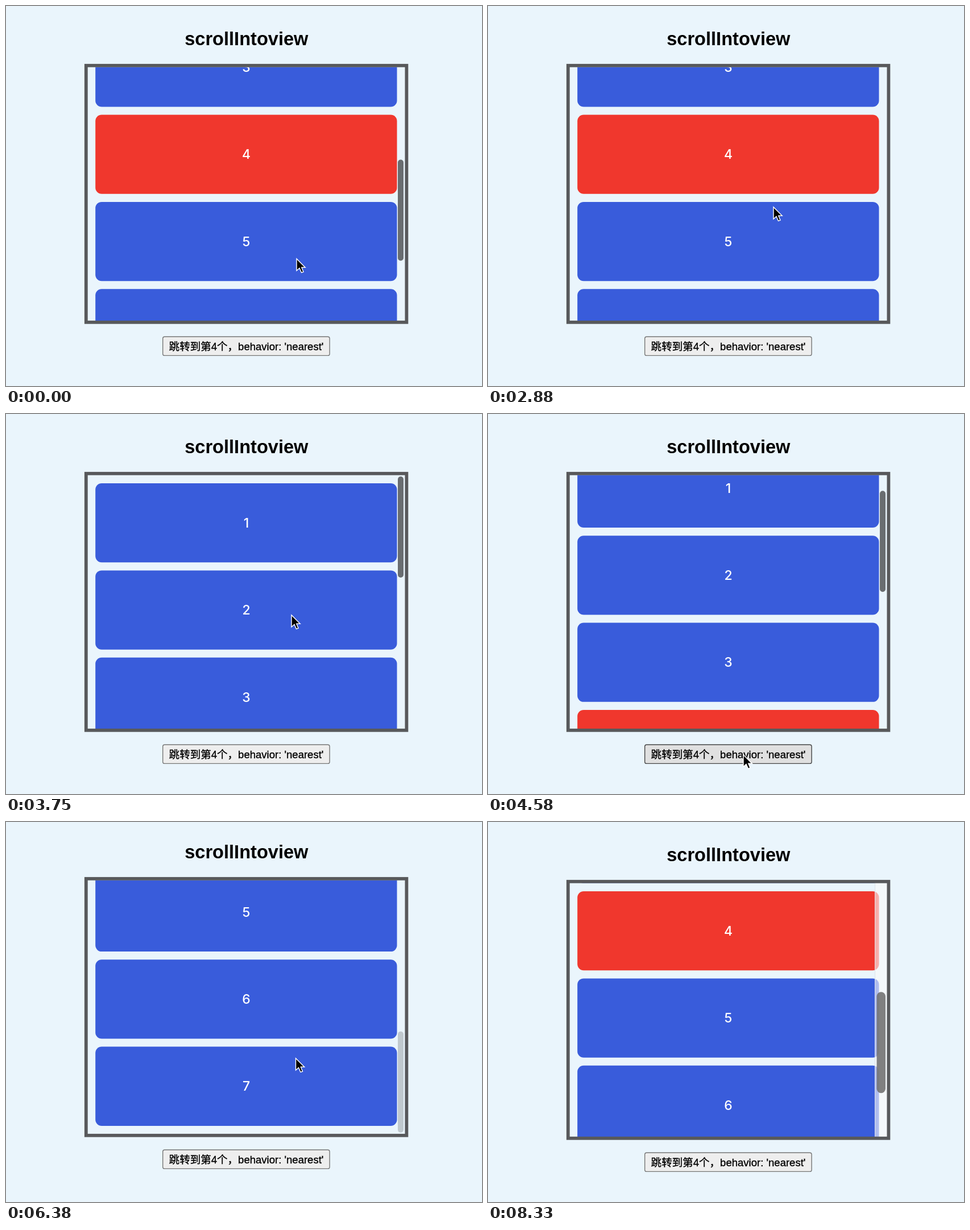
These frames come from a looping animation (837x669 px, 8370 ms). An HTML page:

```html
<!DOCTYPE html>
<html lang="zh-CN">
<head>
<meta charset="utf-8">
<style>
  html, body { margin: 0; width: 100%; height: 100%; overflow: hidden; background: #eaf5fc; }
  svg { display: block; }
  text { text-anchor: middle; font-family: "Liberation Sans", "Noto Sans CJK SC", "Noto Sans CJK", Arial, sans-serif; }
  #items text { font: 500 23px Inter, "Liberation Sans", sans-serif; fill: #fff; }
</style>
</head>
<body>
<svg width="837" height="669" viewBox="0 0 837 669">
  <clipPath id="view"><rect x="143" y="107.5" width="559" height="446.5"/></clipPath>
  <g id="page">
    <text x="422.8" y="69" font-size="32.6" font-weight="bold">scrollIntoview</text>
    <g clip-path="url(#view)">
      <g id="items"></g>
      <g id="track">
        <rect x="680" y="107" width="22" height="448" fill="#fafafa" opacity=".62"/>
        <path d="M680.5 107V555" stroke="#dfe3ea"/>
      </g>
      <rect id="thumb" height="178"/>
    </g>
    <rect x="140.8" y="104.8" width="563.6" height="452" fill="none" stroke="#58595b" stroke-width="5.8"/>
    <rect id="button" x="275.7" y="582.2" width="293.4" height="33.2" rx="3.2" stroke-width="1.4"/>
    <text x="422.5" y="606" font-size="18.55" stroke="#000" stroke-width=".35">跳转到第4个，behavior: 'nearest'</text>
  </g>
  <circle id="ring" fill="none" stroke="#000" stroke-width="1.8"/>
  <path id="cursor" d="M0 0V21L5 16.5L8.5 24.4L12 23L8.8 15.3H15.2Z" fill="#000" stroke="#fff" stroke-width="1.4"/>
</svg>
<script>
const LOOP = 8370, FPS = 24, PITCH = 153.4, BOTTOM = 641.8, START = 390.7;
const $ = id => document.getElementById(id);
const set = (id, attrs) => { for (const k in attrs) $(id).setAttribute(k, attrs[k]); };
const clamp = (v, lo = 0, hi = 1) => Math.max(lo, Math.min(hi, v));

for (let i = 0; i < 7; i++) {
  const y = 122 + i * PITCH;
  $('items').innerHTML +=
    `<rect x="157.2" y="${y}" width="530.3" height="139.3" rx="11" fill="${i == 3 ? '#f0372d' : '#395cdb'}"/>
     <text x="422.5" y="${y + 77.8}">${i + 1}</text>`;
}

// Each visit: press the button, rest elsewhere, then wheel the list to one end.
const visits = [
  { click: 1530, at: [441, 596], rest: [502, 354], wheel: 2949, end: 0 },
  { click: 4270, at: [449, 600], rest: [509.5, 416], wheel: 5254, end: BOTTOM },
  { click: 6760, at: [449, 600], rest: [780, 385] }
];

// Item 4 is fully in view between these offsets, so "nearest" is a clamp.
const nearest = scroll => clamp(scroll, 167.5, 3 * PITCH);

const moves = [], scrolls = [{ start: 0, length: 0, to: START }];
function addScroll(start, length, to) {
  if (to != scrolls.at(-1).to) scrolls.push({ start, length, to });
}
for (const { click, at, rest, wheel, end } of visits) {
  moves.push({ start: click - 360, length: 300, to: at }, { start: click + 400, length: 780, to: rest });
  addScroll(click + 148, 400, nearest(scrolls.at(-1).to));
  if (wheel) addScroll(wheel, 550, end);
}

function follow(t, value, steps, pick = to => to) {
  for (const { start, length, to } of steps) {
    if (t <= start) break;
    const u = clamp((t - start) / length);
    value += (pick(to) - value) * (1 - Math.cos(Math.PI * u)) / 2;
  }
  return value;
}

function draw(t) {
  const scroll = follow(t, START, scrolls);
  const x = follow(t, 511, moves, p => p[0]);
  const y = follow(t, 445, moves, p => p[1]);
  const last = scrolls.findLast(s => s.start <= t);
  const idle = t - last.start - last.length;
  const wide = x > 680;

  // The page gives way a little after the list hits its lower end.
  const bounce = last.to == BOTTOM ? -5 * Math.sin(Math.PI * clamp(idle / 1100)) : 0;
  set('page', { transform: `translate(0 ${bounce})` });
  set('items', { transform: `translate(0 ${-scroll})` });
  set('track', { opacity: wide ? 1 : 0 });
  set('thumb', {
    x: wide ? 683.5 : 689, y: 110 + scroll * .411,
    width: wide ? 15.5 : 10, rx: wide ? 7.7 : 5,
    fill: wide ? '#707070' : '#696d70',
    opacity: wide ? .88 : clamp(1 - (idle - 470) / 150)
  });

  const since = Math.min(...visits.map(v => t < v.click ? Infinity : t - v.click));
  const active = since < 170;
  const hover = x > 275 && x < 569 && y > 582 && y < 616;
  set('button', {
    fill: active ? '#f2f2f2' : hover ? '#e0e0e0' : '#eeeeee',
    stroke: hover && !active ? '#444' : '#767676'
  });

  const u = clamp(since / 300);
  set('ring', { cx: x - 1.5, cy: y + .5, r: 36 * (1 - (1 - u) ** 3), opacity: clamp((1 - u) / .3) });
  set('cursor', { transform: `translate(${x} ${y})`, opacity: clamp((8320 - t) / 100) });
}

const begin = performance.now();
function frame() {
  const ms = (performance.now() - begin) % LOOP;
  draw(Math.floor(ms * FPS / 1000 + .1) * 1000 / FPS);
  requestAnimationFrame(frame);
}
frame();
</script>
</body>
</html>
```
